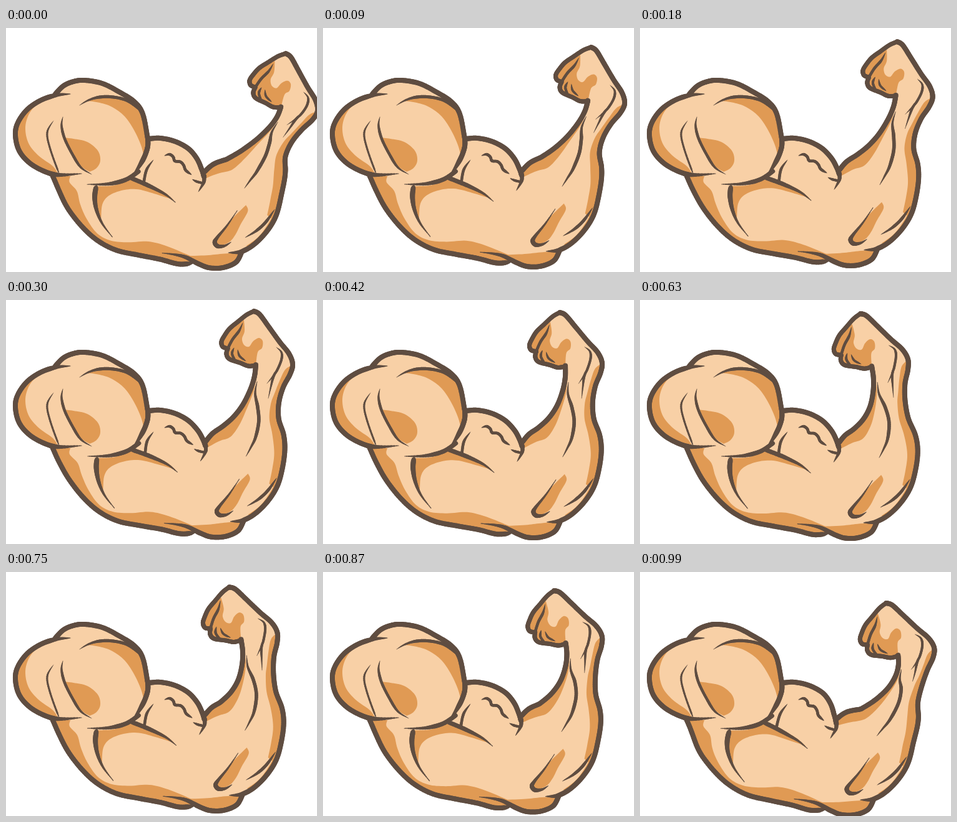
Recreate the animation shown at these times as an HTML page with a canvas. Size 498 by 392 pixels, loop 1020 ms.

```html
<!DOCTYPE html>
<html>
<head>
<meta charset="utf-8">
<title>Flexing arm</title>
<style>
html, body { margin: 0; width: 100%; height: 100%; overflow: hidden; background: #fff; }
canvas { display: block; }
</style>
</head>
<body>
<canvas id="stage" width="498" height="392"></canvas>
<script>
const ctx = document.getElementById('stage').getContext('2d');
const SKIN = '#f8d0a6', SHADE = '#e09a54', INK = '#5f4d41';
const LOOP = 1020, STEP = 30;
const TIP = [397, 18]; // top of the hand as drawn below

// Path of the hand: time, tip x, tip y, turn in degrees
const path = [[0, 448, 41, 7], [180, 412, 22, 3.5], [300, 397, 18, 0], [420, 379, 20, -4],
  [630, 353, 22, -10], [870, 370, 30, -10.5], [990, 394, 50, -11]];

const clamp = v => Math.max(0, Math.min(1, v));
const smooth = v => (v = clamp(v)) * v * (3 - 2 * v);

// Smooth value of column k of the path
function track(k, t) {
  const at = i => path[Math.max(0, Math.min(path.length - 1, i))];
  const slope = i => (at(i + 1)[k] - at(i - 1)[k]) / (at(i + 1)[0] - at(i - 1)[0]);
  let i = 0;
  while (i < path.length - 2 && t >= path[i + 1][0]) i++;
  const h = path[i + 1][0] - path[i][0], s = (t - path[i][0]) / h, r = 1 - s;
  return path[i][k] * (1 + 2 * s) * r * r + path[i + 1][k] * (3 - 2 * s) * s * s
    + h * s * r * (slope(i) * r - slope(i + 1) * s);
}

// The hand moves rigidly, the forearm follows it more and more towards the wrist,
// and the upper arm sinks a little as the hand drops.
function pose(t) {
  const [x, y, turn] = [1, 2, 3].map(k => track(k, t));
  const c = Math.cos(turn * Math.PI / 180), s = Math.sin(turn * Math.PI / 180);
  const sway = .75 * (y - TIP[1]) / 32 + .25 * t / 990;
  return p => {
    const dx = p[0] - TIP[0], dy = p[1] - TIP[1];
    const follow = smooth((270 - p[1]) / 175) * clamp((p[0] - 315) / 30);
    const sink = sway * smooth((p[1] + p[0] / 4 - 265) / 60);
    return [p[0] + follow * (x + c * dx - s * dy - p[0]) - 7 * sink,
      p[1] + follow * (y + s * dx + c * dy - p[1]) + 12 * sink * clamp((p[0] - 100) / 280)];
  };
}

// Curve through the points of a string; "|" marks a corner
function curve(text) {
  const out = [];
  for (const part of text.split('|')) {
    const n = part.trim().split(/\s+/).map(Number), p = [];
    for (let i = 0; i < n.length; i += 2) p.push([n[i], n[i + 1]]);
    const at = i => p[Math.max(0, Math.min(p.length - 1, i))];
    for (let i = 0; i < p.length - 1; i++) {
      const [a, b, c, d] = [at(i - 1), at(i), at(i + 1), at(i + 2)];
      for (let s = 0; s < 1; s += 1 / 8) out.push([0, 1].map(k => b[k] + .5 * s * (c[k] - a[k]
        + s * (2 * a[k] - 5 * b[k] + 4 * c[k] - d[k] + s * (3 * (b[k] - c[k]) + d[k] - a[k])))));
    }
    out.push(at(p.length));
  }
  return out;
}

const shapes = [];
const fill = (color, text) => shapes.push({ color, pts: curve(text) });
// Line of a given width, thinning over the first and last share of its length
const ink = (width, head, tail, text) => shapes.push({ width, head, tail, pts: curve(text) });

const trap = '79 106 92 93 108 86 126 84 154 89 180 102 205 118 219 138 227 178';
const dome = '228 178 247 177 270 182 291 193 307 209 316 224 320 234';
const bend = '320 227 331 214 348 202 365 187 380 167 392 142 398 122 400 104';
const fist = '400 105 388 106 375 101 358 95 353 87 355 78 | 355 78 347 75 345 67 350 57 358 46 370 36 385 24 397 18';
const back = '397 18 406 23 420 42 438 67 453 86 459 103 455 119 444 140 437 165 437 190 445 215 447 240 443 270 435 298 420 322 400 342 380 353 360 355';
const heel = '381 354 372 370 352 379 330 380 312 374 292 364 274 360 254 358';
const under = '303 373 280 375 250 368 215 362 180 355 150 340 125 318 102 289 85 260 74 236';
const shoulder = '121 234 85 236 63 231 38 217 21 197 15 172 19 152 34 131 56 116 80 108 103 106';

fill(SKIN, [trap, dome, bend, fist, back, heel, under, shoulder].join('|'));

// Shoulder and biceps shading
fill(SHADE, '52 119 37 138 31 160 36 185 52 205 75 222 84 236 | 84 236 63 231 38 217 21 197 15 172 19 152 34 131 52 119');
fill(SHADE, '92 176 108 178 130 183 147 197 151 213 145 225 134 231 | 134 231 120 222 107 204 92 176');
fill(SHADE, '130 117 150 120 170 127 190 142 205 164 216 188 221 207 | 221 207 227 180 219 143 200 121 172 111 130 117');
// Underside, heel and chest
fill(SHADE, '74 236 103 238 | 103 238 102 248 115 262 122 282 133 306 150 329 172 340 200 342 232 340 262 347 300 362 | ' + under);
fill(SHADE, '290 362 325 360 350 357 381 354 | 381 354 372 370 352 379 330 380 312 374 290 362');
fill(SHADE, '146 254 175 252 205 241 | 205 241 250 256 272 272 | 272 272 245 264 215 257 190 259 168 268 158 282 156 305 | 156 305 147 285 146 254');
fill(SHADE, '388 278 391 288 380 308 371 326 361 338 346 344 339 340 | 339 340 352 319 368 298 388 278');
fill(SHADE, '388 344 408 329 424 307 441 275 | 441 275 435 298 420 322 400 342 388 344');
// Forearm and fist
fill(SHADE, bend + ' | 400 128 396 148 385 176 374 200 360 219 342 226 320 238');
fill(SHADE, '459 104 447 112 438 130 430 150 424 167 422 190 427 215 430 245 427 270 422 294 | 430 301 443 270 447 240 445 215 437 190 437 165 444 140 455 119 459 104');
fill(SHADE, '381 32 382 50 378 62 381 72 389 75 396 66 405 61 411 66 410 77 403 84 400 105 | 400 105 388 106 375 101 358 95 353 87 355 78 347 75 345 67 350 57 358 46 381 32');

// Outline
ink(8, 0, 0, trap);
ink(7, .5, 0, '131 251 165 250 193 243 213 230');
ink(8, 0, .4, '227 176 227 190 222 206 213 223 202 240');
ink(8, 0, 0, dome);
ink(8, 0, 0, bend);
ink(7, 0, 0, fist);
ink(8, 0, .07, back);
ink(8, 0, .4, heel);
ink(8, .06, 0, under);
ink(8, .14, .14, shoulder);
// Shoulder and biceps lines
ink(5, .4, 0, '118 124 132 116 150 111 172 111 195 117 216 132');
ink(3, .3, .1, '76 149 66 168 71 195 85 234');
ink(4.5, .3, .3, '91 143 89 157 94 178 107 204 120 224 137 235');
// Chest lines
ink(7, .05, .7, '201 240 232 251 258 263 275 276');
ink(4.5, .5, 0, '236 212 226 227 223 247');
ink(8, .1, .75, '146 253 145 270 149 292 158 313 174 334');
ink(4.5, .15, .1, '254 205 262 203 268 207 271 213 280 214 286 219 290 226 300 232');
ink(6, 0, .6, '320 232 320 243 312 258');
ink(4, .5, 0, '302 239 309 242 318 244');
// Elbow lines
ink(7, .5, .35, '374 287 358 311 342 331 338 339 343 345 354 344 364 338');
ink(5, .4, .3, '387 330 405 319 420 305 434 285');
// Forearm lines
ink(5.5, .3, .4, '402 131 399 150 403 172 405 195 400 220 392 237 385 250');
ink(4, .3, .4, '433 76 441 84 441 96 434 113 427 123 418 134');
ink(4, .2, .6, '434 112 428 124 424 140 420 158');
// Fingers
ink(4.5, .4, 0, '379 37 373 50 363 63 355 78');
ink(4, .4, 0, '365 77 362 86 366 96');
ink(3.5, .4, .3, '371 80 374 90 384 98');

function draw(t) {
  const place = pose(t);
  ctx.fillStyle = '#fff';
  ctx.fillRect(0, 0, 498, 392);
  ctx.strokeStyle = INK;
  ctx.lineCap = 'round';
  for (const { pts, color, width, head, tail } of shapes) {
    const q = pts.map(place);
    if (color) {
      ctx.fillStyle = color;
      ctx.beginPath();
      q.forEach(p => ctx.lineTo(...p));
      ctx.fill();
      continue;
    }
    for (let i = 1; i < q.length; i++) {
      const u = (i - .5) / (q.length - 1);
      const thin = Math.min(1, head ? u / head : 1, tail ? (1 - u) / tail : 1);
      ctx.lineWidth = width * Math.max(.15, thin ** .8);
      ctx.beginPath();
      ctx.moveTo(...q[i - 1]);
      ctx.lineTo(...q[i]);
      ctx.stroke();
    }
  }
}

let last = -1;
function tick() {
  const t = Math.floor(performance.now() % LOOP / STEP) * STEP;
  if (t !== last) draw(last = t);
  requestAnimationFrame(tick);
}
tick();
</script>
</body>
</html>
```
